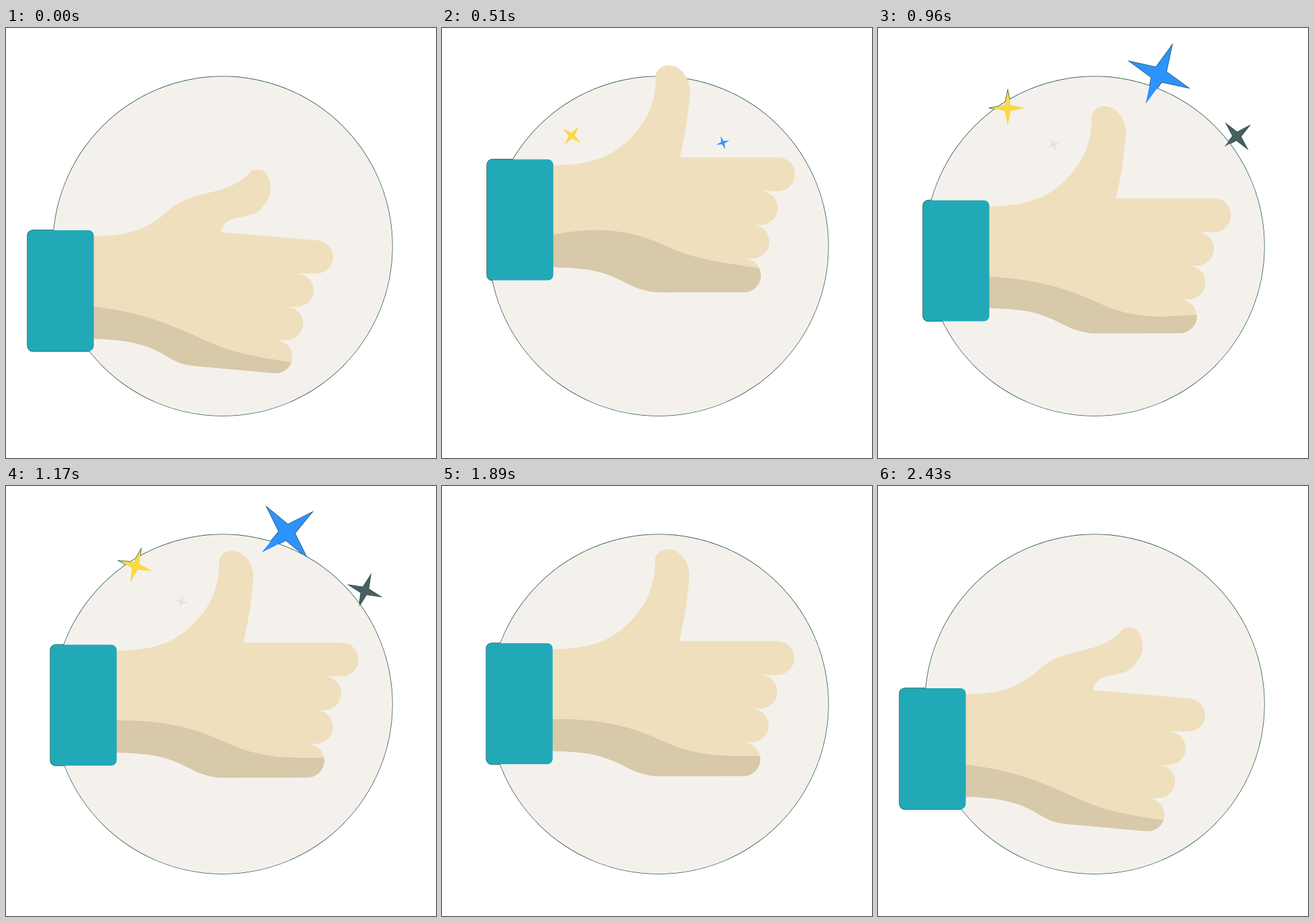
Animation of 640x640 px, one loop 2.49 s. Source, as an HTML page with a canvas:

```html
<!DOCTYPE html>
<html>
<head>
<meta charset="utf-8">
<title>Thumbs up</title>
<style>
html, body { margin: 0; width: 100%; height: 100%; overflow: hidden; background: #fff; }
canvas { display: block; }
</style>
</head>
<body>
<canvas id="stage" width="640" height="640"></canvas>
<script>
const ctx = document.getElementById('stage').getContext('2d');
const LOOP = 2490;
const EDGE = '#1f4f45', SKIN = '#efdfbd', SHADE = '#d8c9aa', TEAL = '#22a9b7', DISC = '#f4f1ed';

const clamp = u => Math.min(1, Math.max(0, u));
const smooth = u => (1 - Math.cos(Math.PI * clamp(u))) / 2;
const mix = (a, b, p) => a + (b - a) * p;
const rad = deg => deg * Math.PI / 180;

// Eased share of the way from time a to time b; skew delays the ease.
const ease = (t, a, b, skew = 1) => smooth(clamp((t - a) / (b - a)) ** skew);

function motion(t) {
  const back = ease(t, 1890, 2370);
  const settle = ease(t, 930, 1230);
  return {
    x: 32 + 35 * ease(t, 120, 480) - settle - 34 * back,
    y: 301 - 108 * ease(t, 120, 540, 1.45) + 64 * ease(t, 540, 920) - 23 * settle + 67 * back,
    pose: ease(t, 120, 440) - back,
    sway: -18 * ease(t, 120, 380) + 26 * ease(t, 540, 940) - 8 * settle
  };
}

// Knots are [x, y, heading in degrees], measured from the cuff's corner.
const relaxed = {
  thumb: [[92, 8, 3], [208, -28, -43], [332, -87, -49], [344, -90, 0], [362, -61, 90],
    [351, -36, 124], [306, -17, 164], [288, 3, 95]],
  base: [[248, 202, 185], [208, 188, 212], [92, 161, 183]],
  shade: [[92, 113, 6], [258, 161, 25], [398, 197, 8]]
};
const raised = {
  thumb: [[92, 9, 0], [212, -30, -45], [251, -123, -90], [270, -140, 0], [302, -100, 92],
    [299, -69, 97], [292, -25, 102], [287, -3, 104]],
  base: [[259, 198, 180], [199, 180, 207], [92, 160, 183]],
  shade: [[92, 113, -1], [264, 146, 25], [414, 168, 0]]
};

const stars = [
  { color: '#f9d949', x: 193, y: 119, r: 26, start: 330, exit: 1330, angle: 17.6, spin: 399, fall: 0 },
  { color: '#2e92ff', x: 418, y: 69, r: 48, start: 466, exit: 1500, angle: 53, spin: 180, fall: 0 },
  { color: '#e3e3e2', x: 261, y: 172, r: 11, start: 525, exit: 1440, angle: 22, spin: 200, fall: 0 },
  { color: '#4a5f5f', x: 534, y: 156, r: 25, start: 585, exit: 1365, angle: 40, spin: 261, fall: 28 }
];

// Smooth curve through knots, leaving each one along its heading.
function curve(path, knots) {
  path.lineTo(knots[0][0], knots[0][1]);
  for (let i = 1; i < knots.length; i++) {
    const [x0, y0, h0] = knots[i - 1], [x1, y1, h1] = knots[i];
    const reach = .375 * Math.hypot(x1 - x0, y1 - y0);
    path.bezierCurveTo(
      x0 + reach * Math.cos(rad(h0)), y0 + reach * Math.sin(rad(h0)),
      x1 - reach * Math.cos(rad(h1)), y1 - reach * Math.sin(rad(h1)), x1, y1);
  }
}

function starPath(s, t) {
  const path = new Path2D();
  const gone = ease(t, s.exit, s.exit + 240);
  if (t <= s.start || gone === 1) return path;
  const left = (1 - clamp((t - s.start) / 570)) ** 3;
  const turn = s.angle - s.spin * (1 - clamp((t - s.start) / 750)) ** 1.7;
  const y = s.y + 130 * left + s.fall * gone;
  const size = s.r * (1 - left) * (1 - gone);
  for (let i = 0; i < 8; i++) {
    const a = rad(turn + i * 45), r = i % 2 ? size * .25 : size;
    path.lineTo(s.x + r * Math.cos(a), y + r * Math.sin(a));
  }
  path.closePath();
  return path;
}

function fill(path, color) {
  ctx.fillStyle = color;
  ctx.fill(path);
}

function drawHand({ x, y, pose, sway }) {
  const part = name => relaxed[name].map((knot, i) =>
    knot.map((v, j) => mix(v, raised[name][i][j], pose)));
  const hand = new Path2D(), shade = new Path2D();

  curve(hand, part('thumb'));
  const top = mix(15, -3, pose), height = mix(49.5, 50.2, pose);
  for (let i = 0; i < 4; i++) {
    const tip = mix(442, 445.5, pose) - mix(15.9, 12.6, pose) * i + (i ? 0 : 13);
    hand.ellipse(tip - 25, top + height * (i + .5), 25, height / 2, 0, -Math.PI / 2, Math.PI / 2);
  }
  curve(hand, part('base'));
  hand.closePath();

  // The shadow's middle swings most and its ends bend to follow.
  const [wrist, palm, finger] = part('shade');
  wrist[2] += .55 * sway;
  palm[1] += sway;
  finger[1] += .25 * sway;
  finger[2] -= .55 * sway;
  curve(shade, [wrist, palm, finger]);
  shade.lineTo(440, finger[1]);
  shade.lineTo(440, 260);
  shade.lineTo(wrist[0], 260);

  ctx.save();
  ctx.translate(x, y);
  fill(hand, SKIN);
  ctx.clip(hand);
  fill(shade, SHADE);
  ctx.restore();
}

function draw(t) {
  const now = motion(t);
  const cuff = new Path2D(), disc = new Path2D();
  cuff.roundRect(now.x, now.y, 98.7, 180, 8);
  disc.arc(322.5, 324.7, 252.4, 0, 2 * Math.PI);
  const sparkles = stars.map(s => starPath(s, t));

  ctx.fillStyle = '#fff';
  ctx.fillRect(0, 0, 640, 640);
  // Edges go first so the disc hides the parts inside it.
  ctx.strokeStyle = EDGE;
  ctx.lineWidth = 1.4;
  [cuff, ...sparkles, disc].forEach(p => ctx.stroke(p));
  fill(disc, DISC);
  sparkles.forEach((p, i) => fill(p, stars[i].color));
  drawHand(now);
  fill(cuff, TEAL);
}

function frame() {
  draw(performance.now() % LOOP);
  requestAnimationFrame(frame);
}
frame();
</script>
</body>
</html>
```
